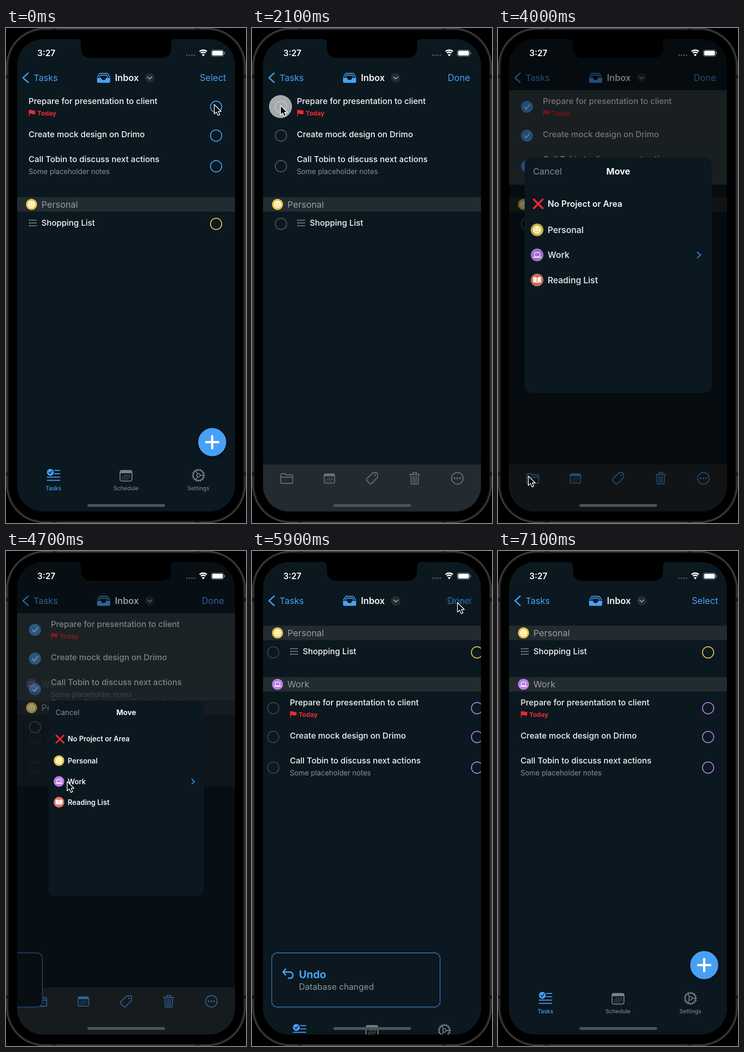
Recreate the animation shown at these times as an HTML page with a canvas. Size 522 px wide and 1074 px high, loop 7.42 s.

```html
<!DOCTYPE html>
<html lang="en">
<head>
<meta charset="utf-8">
<title>Moving tasks</title>
<style>
  html, body { margin: 0; width: 100%; height: 100%; overflow: hidden; background: #000; }
  canvas { display: block; }
</style>
</head>
<body>
<canvas id="stage" width="522" height="1074"></canvas>
<script>
const c = document.getElementById('stage').getContext('2d');
const BG = '#0b1820', BAND = '#222b30', BLUE = '#48a0f5', GREY = '#8a9297', DIM = '#777f83',
      WHITE = '#f5f6f7', RED = '#f0282f', YELLOW = '#eac647', PURPLE = '#b87ee4', CORAL = '#e87864';
const LOOP = 7420, LAST = 7100, STEP = 100;
let t = 0;

const tasks = [
  { title: 'Prepare for presentation to client', y: 159, cy: 171, top: 135, end: 207, flag: true, picked: 2250 },
  { title: 'Create mock design on Drimo', y: 231, cy: 233.5, top: 207, end: 260, picked: 2550 },
  { title: 'Call Tobin to discuss next actions', y: 285, cy: 300, top: 260, end: 340, note: 'Some placeholder notes', picked: 2850 }
];
// time, x, y of the pointer tip
const pointer = [
  [800, 453, 166], [1100, 446, 112], [1600, 446, 112], [2000, 62, 168], [2200, 62, 168],
  [2450, 62, 230], [2600, 62, 230], [2750, 62, 297], [2850, 62, 297], [3150, 57, 938],
  [3300, 59, 939], [3600, 66, 972], [4050, 66, 972], [4400, 133, 500], [5000, 133, 500],
  [5500, 447, 112], [6300, 447, 112], [6700, 440, -30]
];
const taps = [1300, 2100, 2500, 2800, 3700, 4500, 5700];

const clamp = v => Math.max(0, Math.min(1, v));
function ramp(a, b) {
  const u = clamp((t - a) / (b - a));
  return u * u * (3 - 2 * u);
}

function group(fn, { x = 0, y = 0, scale = 1, alpha = 1 } = {}) {
  if (alpha <= 0 || scale <= 0) return;
  c.save();
  c.translate(x, y);
  c.scale(scale, scale);
  c.globalAlpha *= alpha;
  fn();
  c.restore();
}
function fill(d, color) {
  c.fillStyle = color;
  c.fill(new Path2D(d));
}
function line(d, color, width = 2) {
  c.strokeStyle = color;
  c.lineWidth = width;
  c.stroke(new Path2D(d));
}
function rect(x, y, w, h, color) {
  c.fillStyle = color;
  c.fillRect(x, y, w, h);
}
function box(x, y, w, h, r, color, width) {
  c.beginPath();
  c.roundRect(x, y, w, h, r);
  paint(color, width);
}
function disc(x, y, r, color, width) {
  c.beginPath();
  c.arc(x, y, r, 0, 7);
  paint(color, width);
}
function paint(color, width) {
  if (width) {
    c.strokeStyle = color;
    c.lineWidth = width;
    c.stroke();
  } else {
    c.fillStyle = color;
    c.fill();
  }
}
// y is the middle of the capitals
function text(s, x, y, size, color = WHITE, weight = 400, align = 'left') {
  c.font = `${weight} ${size}px Inter, "Open Sans", sans-serif`;
  c.textAlign = align;
  c.fillStyle = color;
  c.fillText(s, x, y + size * .36);
}

const badges = {
  smile() {
    disc(0, 0, 12, YELLOW);
    disc(0, 0, 7.8, '#fffbe9');
    disc(-2.8, -2, 1.3, YELLOW);
    disc(2.8, -2, 1.3, YELLOW);
    line('M-4 2Q0 6 4 2', YELLOW, 1.3);
  },
  laptop() {
    disc(0, 0, 12, PURPLE);
    box(-5, -4.5, 10, 7.5, 1, '#fff', 1.2);
    line('M-7.5 4.5H7.5', '#fff', 1.4);
  },
  book() {
    disc(0, 0, 12, CORAL);
    fill('M-.5 -4.5Q-4 -7 -7.5 -5V5Q-4 3.5 -.5 6ZM.5 -4.5Q4 -7 7.5 -5V5Q4 3.5 .5 6Z', '#fff');
  }
};
const badge = (name, x, y, scale = 1) => group(badges[name], { x, y, scale });

function calendar(color) {
  box(-13, -11, 26, 23, 4, color, 2);
  box(-13.5, -11.5, 27, 6.5, [4, 4, 0, 0], color);
  for (let i = 1; i < 14; i++)
    disc(-8 + i % 5 * 4, -.5 + Math.floor(i / 5) * 4, 1.1, color);
}
function gear() {
  const spoke = (a, from, to, width) => {
    const x = Math.cos(a), y = Math.sin(a);
    line(`M${x * from} ${y * from}L${x * to} ${y * to}`, DIM, width);
  };
  disc(0, 0, 11.3, DIM, 2);
  for (let i = 0; i < 16; i++) spoke(i * Math.PI / 8, 11.5, 13.6, 2.2);
  disc(0, 0, 3.8, DIM, 1.8);
  for (const a of [0, 2.1, 4.2]) spoke(a, 4, 11, 1.8);
}

function phone() {
  rect(0, 0, 522, 1074, '#000');
  box(3.5, 2.5, 515, 1069, 80, '#222323', 4);
  box(1.5, .8, 519, 1072.4, 82, '#555656', 1.4);
  for (const y of [102, 964]) for (const x of [1, 517]) rect(x, y, 4, 7, '#151515');
  for (const x of [102, 412]) for (const y of [1, 1069]) rect(x, y, 8, 4, '#151515');
}

function navBar(edit) {
  line('M48 98L37 108L48 118', BLUE, 3);
  text('Tasks', 60, 108, 19.2, BLUE);
  fill('M198 108H206.5Q208 113 212.3 113Q216.5 113 218 108H226.6V116Q226.6 119 223.5 119H201Q198 119 198 116Z', BLUE);
  line('M199 106L204 98.5H220.5L225.5 106M203.5 106L206 102.5H218.5L221 106', BLUE, 1.8);
  text('Inbox', 237, 108.5, 19.4, WHITE, 600);
  disc(312.5, 108, 10.3, '#252c30');
  line('M308 106.3L312.5 110.6L317 106.3', '#9aa1a5');
  group(() => text('Select', 450, 108.5, 19.4, BLUE, 400, 'center'), { alpha: 1 - edit });
  group(() => text('Done', 450, 108.5, 19.4, BLUE, 400, 'center'), { alpha: edit ** 2 });
}

function flag(x, y) {
  line(`M${x} ${y - 6.5}V${y + 6.5}`, RED, 1.6);
  fill(`M${x} ${y - 6}q3.5 -1.5 7 0t6 0v8q-3 1.5 -6.5 0t-6.5 0Z`, RED);
}
function rings(cy, edit, color, checked) {
  const left = 63 - (1 - edit) * 53;
  group(() => {
    if (checked) {
      disc(left, cy, 13, BLUE);
      line(`M${left - 5} ${cy + .5}l3.6 4.4l7 -9.6`, '#fff');
    } else disc(left, cy, 12.2, '#525c61', 1.9);
  }, { alpha: edit });
  group(() => disc(457 + edit * 47.5, cy, 12.2, color, 2), { alpha: clamp((1 - edit) * 4) });
}
function taskRows(edit, color, canPick) {
  const x = 49 + 48.5 * edit;
  for (const k of tasks) {
    const picked = canPick && t >= k.picked;
    if (picked) rect(24, k.top, 474, k.end - k.top, '#343f45');
    text(k.title, x, k.y, 17.85, WHITE, 500);
    if (k.flag) {
      flag(x + 1.5, 184.5);
      text('Today', x + 19, 185, 13.8, RED, 700);
    }
    if (k.note) text(k.note, x, 311, 15.4, GREY);
    rings(k.cy, edit, color, picked);
  }
}
function heading(name, icon, y, band = 1) {
  group(() => rect(24, y - 16, 474, 31.5, BAND), { alpha: band });
  badge(icon, 55.5, y - .3);
  text(name, 77, y, 19.3, '#969da1');
}
function list(edit) {
  const move = ramp(4600, 4940), dx = 48.5 * edit;
  group(() => taskRows(edit, BLUE, true), { alpha: 1 - ramp(4600, 4970) });
  group(() => {
    group(() => rect(24, 305, 474, 205, '#343f45'), { alpha: 1 - ramp(5000, 5400) });
    heading('Work', 'laptop', 289.5, ramp(5000, 5400));
    group(() => taskRows(edit, PURPLE, false), { y: 170 });
  }, { alpha: ramp(4600, 4870) });
  group(() => {
    heading('Personal', 'smile', 383);
    for (const y of [417, 423, 429]) {
      disc(51.5 + dx, y, 1.5, GREY);
      line(`M${54 + dx} ${y}h12.5`, GREY, 1.3);
    }
    text('Shopping List', 77 + dx, 422.5, 17.85, WHITE, 500);
    rings(425, edit, YELLOW, false);
  }, { y: -205 * move });
}

function tabBar(edit) {
  group(() => {
    disc(96.5, 964, 7.5, BLUE);
    line('M93 964L95.7 967L100.2 961', BG, 1.7);
    line('M105.5 960H117M105.5 967H117M89.5 974.5H117M89.5 981.5H117', BLUE, 2.1);
    group(() => calendar(DIM), { x: 261, y: 971 });
    group(gear, { x: 418.5, y: 970.5 });
    text('Tasks', 103, 998.5, 12.2, BLUE, 500, 'center');
    text('Schedule', 261, 998.5, 12.2, DIM, 500, 'center');
    text('Settings', 418.5, 998.5, 12.2, DIM, 500, 'center');
  }, { y: 102 * edit, alpha: edit < 1 ? 1 : 0 });
}
function addButton() {
  const shown = 1 - ramp(1300, 1650) + ramp(6050, 6400);
  group(() => {
    c.shadowColor = 'rgba(0,0,0,.4)';
    c.shadowBlur = 6;
    c.shadowOffsetY = 2;
    disc(0, 0, 30.5, BLUE);
    c.shadowColor = 'transparent';
    line('M-13 0H13M0 -13V13', '#fff', 5);
  }, { x: 448.5, y: 898.5, scale: shown, alpha: shown });
}
function toolBar() {
  const color = t >= tasks[0].picked ? BLUE : '#6b7377';
  const icons = [
    () => {
      line('M-13 -7Q-13 -10 -10 -10H-4L-1.5 -7.5H10Q13 -7.5 13 -4.5V8Q13 11 10 11H-10Q-13 11 -13 8Z', color, 1.8);
      line('M-13 -2.5H13', color, 1.8);
    },
    () => group(() => calendar(color), { scale: .88 }),
    () => {
      line('M2 -12H8Q12 -12 12 -8V-2L-1 11.5Q-3 13.5 -5 11.5L-11.5 5Q-13.5 3 -11.5 1Z', color, 1.9);
      disc(6.5, -6.5, 1.8, color);
    },
    () => {
      line('M-11 -8.5H11M-4 -9V-12.5H4V-9M-8.5 -8L-7.5 12.5H7.5L8.5 -8', color, 1.8);
      line('M-3.8 -5L-3.3 9.5M0 -5V9.5M3.8 -5L3.3 9.5', color, 1.6);
    },
    () => {
      disc(0, 0, 12.5, color, 2);
      for (const x of [-6, 0, 6]) disc(x, 0, 1.9, color);
    }
  ];
  group(() => {
    rect(24, 947, 474, 102, '#232b30');
    icons.forEach((draw, i) => group(draw, { x: 75.5 + 92.8 * i, y: 977 }));
  }, { alpha: ramp(1750, 2000) - ramp(5700, 5900) });
}
function toast() {
  const away = 1 - ramp(4600, 4975) + ramp(5950, 6300);
  group(() => {
    box(43, 872, 366, 117.5, 12, BG);
    box(43, 872, 366, 117.5, 12, '#2f69a8', 1.8);
    line('M73 907L67.5 913.5L73 920M68 913.5H82Q89 914 89 920.5Q89 927 82 927H79', BLUE, 3);
    text('Undo', 102, 919, 22.8, BLUE, 700);
    text('Database changed', 102, 945.5, 18.4, '#8e969a');
  }, { x: -400 * away, alpha: away < 1 ? 1 : 0 });
}

function movePanel() {
  const closing = ramp(4600, 4980), opening = clamp((t - 3800) / 200);
  if (t >= 4000) group(() => rect(24, 24, 474, 1025, '#000'), { alpha: .52 * (1 - ramp(4600, 4900)) });
  group(() => {
    c.translate(-261.5, -536.5);
    box(58, 281, 407, 511, 15, BG);
    text('Cancel', 76, 311.5, 19.2, '#858d91');
    text('Move', 261.5, 311.5, 19.3, WHITE, 700, 'center');
    line('M78 372L97 391M97 372L78 391', RED, 4.2);
    text('No Project or Area', 108, 381, 18.4, WHITE, 600);
    group(() => {
      [['Personal', 'smile'], ['Work', 'laptop'], ['Reading List', 'book']].forEach(([name, icon], i) => {
        const y = 438 + i * 54.4;
        badge(icon, 85, y, 1.15);
        text(name, 108, y + .3, 18.5, WHITE, 600);
      });
      line('M434 486.5L440.5 492.5L434 498.5', '#2b86e2', 2.8);
    }, { alpha: ramp(3800, 4060) });
  }, { x: 261.5, y: 536.5, scale: opening * (1 - closing) });
}

function statusBar() {
  text('3:27', 68, 54.5, 18.3, '#fff', 600);
  for (let i = 0; i < 4; i++) disc(393.7 + 5.4 * i, 59, 1.8, '#4c565b');
  c.lineCap = 'butt';
  for (const r of [12, 7.5]) {
    c.beginPath();
    c.arc(429, 60, r, -2.3, -.84);
    paint('#fff', 2.8);
  }
  fill('M429 61.5L425.8 57.8Q429 55.2 432.2 57.8Z', '#fff');
  box(446.5, 47.5, 27, 14, 4.2, '#79828a', 1.2);
  box(448.3, 49.3, 23.4, 10.4, 2.8, '#fff');
  box(474.5, 52, 1.8, 5, 1, '#79828a');
  box(177, 1033, 169, 6, 3, '#4d5458');
  fill('M155 23V24Q163 24 163 32V43Q163 65 186 65H336Q359 65 359 43V32Q359 24 367 24V23Z', '#000');
}

function cursor() {
  if (t >= 6700) return;
  let [, x, y] = pointer[0];
  for (let i = 1; i < pointer.length; i++) {
    const u = ramp(pointer[i - 1][0], pointer[i][0]);
    x += (pointer[i][1] - pointer[i - 1][1]) * u;
    y += (pointer[i][2] - pointer[i - 1][2]) * u;
  }
  const press = Math.max(...taps.map(p => 1 - Math.abs(t - p) / 200));
  group(() => {
    group(() => disc(0, 2.5, 25, '#fff'), { alpha: .63 * press });
    const arrow = 'M0 0V20.5L4.7 16.3L8 23.8L11.8 22.2L8.6 14.9H14.8Z';
    fill(arrow, '#000');
    line(arrow, '#fff', 1.5);
  }, { x, y });
}

function draw() {
  const now = performance.now() % LOOP;
  t = Math.min(LAST, Math.floor(now / STEP) * STEP);
  const edit = ramp(1400, 1800) - ramp(5750, 6150);
  c.lineJoin = 'round';
  c.lineCap = 'butt';
  phone();
  c.save();
  c.beginPath();
  c.roundRect(24, 24, 474, 1025, 56);
  c.clip();
  rect(24, 24, 474, 1025, BG);
  c.lineCap = 'round';
  list(edit);
  navBar(edit);
  tabBar(edit);
  addButton();
  toolBar();
  toast();
  movePanel();
  statusBar();
  c.restore();
  cursor();
  requestAnimationFrame(draw);
}
draw();
</script>
</body>
</html>
```
